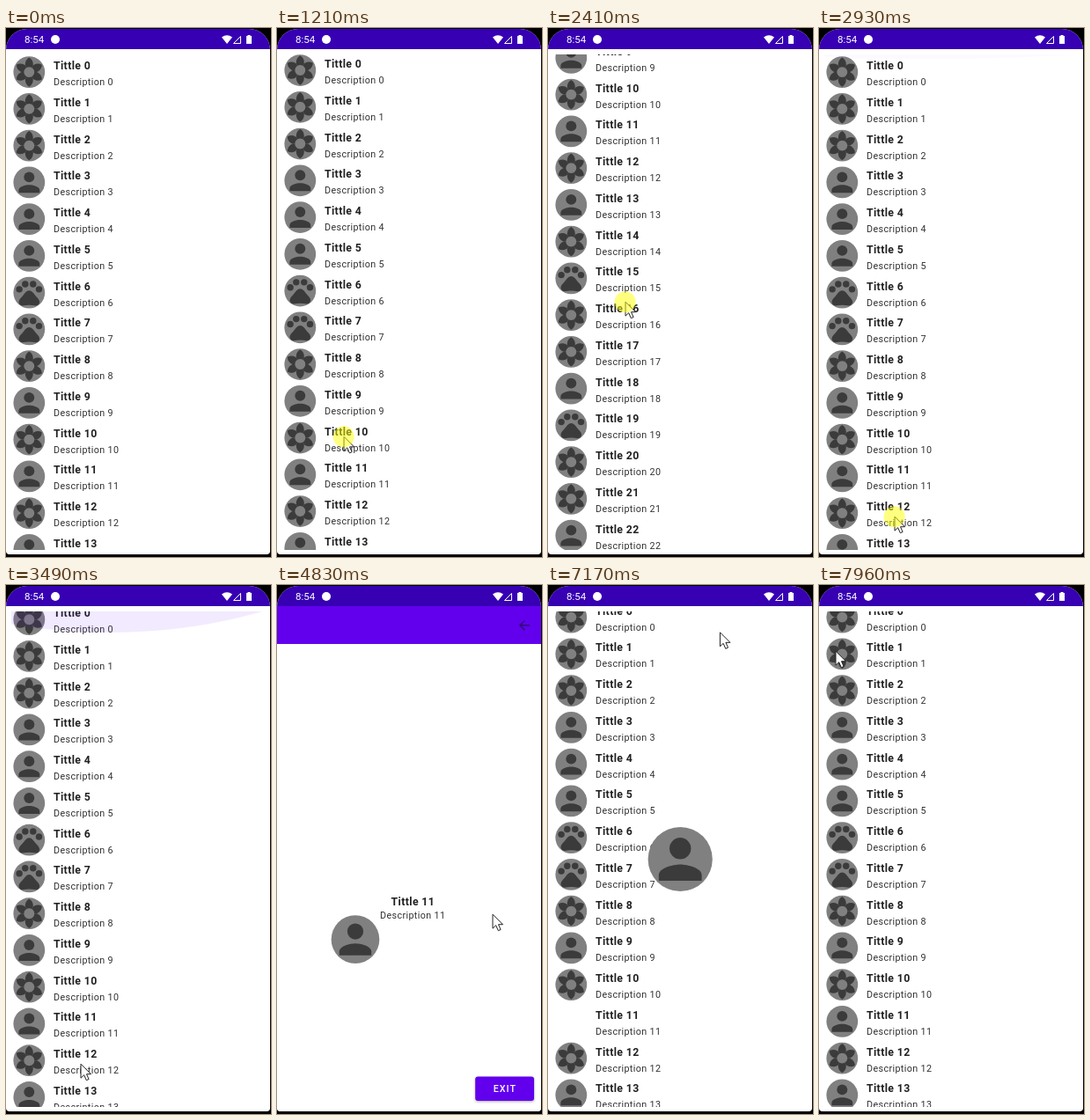
These frames come from a looping animation (301x601 px, 8000 ms). An HTML page with a canvas:

```html
<!DOCTYPE html>
<html lang="en">
<head>
<meta charset="utf-8">
<title>List and detail</title>
<style>
html, body { margin: 0; width: 100%; height: 100%; overflow: hidden; background: #000; }
canvas { display: block; width: 301px; height: 601px; }
</style>
</head>
<body>
<canvas id="stage"></canvas>
<script>
const W = 301, H = 601, LOOP = 8000;
const PITCH = 41.75, DP = 0.767;
const KINDS = 'FFFPPPAAFPFPFPFAFFPAFFPF';
const PICKED = 11;
const GREY = '#808080', DARK = '#3b3b3b', PURPLE = '#6200ee';
const canvas = document.getElementById('stage');
const ctx = canvas.getContext('2d');
const dpr = window.devicePixelRatio || 1;
canvas.width = W * dpr;
canvas.height = H * dpr;

function smooth(t, from, to) {
  const u = Math.min(1, Math.max(0, (t - from) / (to - from)));
  return u * u * (3 - 2 * u);
}

// Each pointer move eases to x, y between two times.
const MOVES = [
  [320, 820, 42, 547], [820, 1070, 76, 470], [1170, 1800, 79, 72],
  [2190, 2390, 88, 312], [2430, 2900, 86, 556], [3250, 3460, 85, 545],
  [3510, 4150, 26, 499], [4440, 4800, 245, 375], [5250, 5560, 172, 447],
  [5560, 6090, 254, 88], [6110, 6360, 275, 45], [6800, 7800, 19, 76]
];
const PRESSES = [[1120, 1870], [2350, 3440], [4150, 4290], [6550, 6760], [7810, 7955]];

function pointer(t) {
  let x = 179, y = 171;
  for (const [from, to, toX, toY] of MOVES) {
    const u = smooth(t, from, to);
    x += (toX - x) * u;
    y += (toY - y) * u;
  }
  return [x, y];
}

// Drag up, fling back to the top, then a short nudge.
const scrollAt = t =>
  392 * (smooth(t, 1185, 1800) - smooth(t, 2430, 2930)) + 13.5 * smooth(t, 3250, 3585);
const glowAt = t => smooth(t, 2900, 3050) * (1 - smooth(t, 3300, 3690));
const pageAt = t => smooth(t, 4560, 4760) - smooth(t, 6900, 7150);
const heroAt = t => smooth(t, 4700, 4960) - smooth(t, 7230, 7500);

function disc(x, y, r, color) {
  ctx.fillStyle = color;
  ctx.beginPath();
  ctx.arc(x, y, r, 0, Math.PI * 2);
  ctx.fill();
}

function box(x, y, w, h, color) {
  ctx.fillStyle = color;
  ctx.fillRect(x, y, w, h);
}

function text(str, x, y, font, color, spacing) {
  ctx.font = font + ' Roboto, sans-serif';
  ctx.letterSpacing = spacing * DP + 'px';
  ctx.fillStyle = color;
  ctx.fillText(str, x, y);
}

const title = (n, x, y) => text('Tittle ' + n, x, y, `bold ${16 * DP}px`, '#212121', 0.5);
const caption = (n, x, y) => text('Description ' + n, x, y, `${14 * DP}px`, '#303030', 0.5);

// Glyphs live in a 24 x 24 box centred on 12, 12.
const SHOULDERS = new Path2D('M12 14c-2.67 0-8 1.34-8 4v2h16v-2c0-2.66-5.33-4-8-4z');
const PETAL = new Path2D('M9 6Q9 2.6 12 .8Q15 2.6 15 6L14.92 6.95L12 12L9.08 6.95z');
const PAD = new Path2D('M17.3 14.9L14.9 12Q12 8.8 9.1 12L6.7 14.9Q3.4 18 4.2 20Q5 22 7 22Q12 21 17 22Q19 22 19.8 20Q20.6 18 17.3 14.9z');
const BACK = new Path2D('M20 11H7.8l5.6-5.6L12 4l-8 8 8 8 1.4-1.4L7.8 13H20z');
const ARROW = new Path2D('M.5 .5V16.5L4.2 13L6.8 19L9.6 17.8L7 12H12z');

const glyphs = {
  P() {
    disc(12, 8, 4, DARK);
    ctx.fill(SHOULDERS);
  },
  A() {
    for (const side of [-1, 1]) {
      disc(12 + side * 7.5, 9.5, 2.5, DARK);
      disc(12 + side * 3, 5.5, 2.5, DARK);
    }
    ctx.fill(PAD);
  },
  F() {
    ctx.fillStyle = DARK;
    for (let i = 0; i < 6; i++) {
      ctx.fill(PETAL);
      ctx.translate(12, 12);
      ctx.rotate(Math.PI / 3);
      ctx.translate(-12, -12);
    }
    disc(12, 12, 4, GREY);
  }
};

function inIconBox(x, y, scale, paint) {
  ctx.save();
  ctx.translate(x, y);
  ctx.scale(scale, scale);
  ctx.translate(-12, -12);
  paint();
  ctx.restore();
}

function avatar(kind, x, y, r) {
  disc(x, y, r, GREY);
  inIconBox(x, y, r / 12, glyphs[kind]);
}

function drawGlow(amount, touchX) {
  if (amount <= 0) return;
  const width = 289, r = width * 1.2;
  ctx.save();
  ctx.translate(6 + width / 4 + (touchX - 6) / 2, 30);
  ctx.scale(1, amount);
  disc(0, -r * Math.cos(Math.PI / 6), r, `rgba(98,0,238,${0.16 * amount})`);
  ctx.restore();
}

function drawList(t, touchX, heroAway) {
  const scroll = scrollAt(t);
  ctx.save();
  ctx.beginPath();
  ctx.rect(6, 30, 290, 563);
  ctx.clip();
  for (let i = 0; i < KINDS.length; i++) {
    const y = 50.1 + i * PITCH - scroll;
    if (y < 0 || y > 630) continue;
    if (!(heroAway && i === PICKED)) avatar(KINDS[i], 26.3, y, 17.9);
    title(i, 54, y - 3);
    caption(i, 54, y + 15);
  }
  drawGlow(glowAt(t), touchX);
  ctx.restore();
}

function drawButton() {
  ctx.save();
  ctx.shadowColor = 'rgba(0,0,0,.35)';
  ctx.shadowBlur = 3 * dpr;
  ctx.shadowOffsetY = dpr;
  ctx.fillStyle = PURPLE;
  ctx.beginPath();
  ctx.roundRect(225.2, 558.4, 66.8, 27.6, 3);
  ctx.fill();
  ctx.restore();
  text('EXIT', 245.8, 576.4, `500 ${14 * DP}px`, '#fff', 1.25);
}

function drawDetail(alpha) {
  if (alpha <= 0) return;
  ctx.save();
  ctx.globalAlpha = alpha;
  box(0, 24, 300, 575, '#fff');
  box(0, 24, 300, 43, PURPLE);
  inIconBox(281, 45.8, DP, () => {
    ctx.fillStyle = '#330a78';
    ctx.fill(BACK);
  });
  title(PICKED, 129.6, 363.5);
  caption(PICKED, 117, 379.4);
  drawButton();
  ctx.restore();
}

function drawStatus() {
  box(0, 0, 300, 24, '#3700b3');
  text('8:54', 21, 17.3, '11.5px', '#fff', 0);
  disc(56, 13, 5, '#fff');

  ctx.beginPath();
  ctx.moveTo(251, 18);
  ctx.lineTo(245, 10.5);
  ctx.quadraticCurveTo(251, 6, 257, 10.5);
  ctx.fill();

  ctx.strokeStyle = '#fff';
  ctx.lineWidth = 1;
  ctx.stroke(new Path2D('M258.5 17.5h8v-8z'));

  box(273, 9, 6, 9, '#fff');
  box(274.5, 8, 3, 1, '#fff');
}

function drawHero(p) {
  avatar(KINDS[PICKED], 26.3 + 123.9 * p, 495.9 - 184.4 * p, 17.9 + 18.7 * p);
}

function drawPointer(t, x, y) {
  if (t < 320) return;
  ctx.save();
  ctx.translate(x - 0.5, y - 1.3);
  ctx.fillStyle = '#fff';
  ctx.fill(ARROW);
  ctx.strokeStyle = '#222';
  ctx.lineWidth = 1;
  ctx.stroke(ARROW);
  ctx.restore();
  if (PRESSES.some(([from, to]) => t >= from && t < to)) {
    disc(x - 0.4, y - 0.8, 12, 'rgba(255,255,0,.5)');
  }
}

function draw(t) {
  const [x, y] = pointer(t);
  const page = pageAt(t), hero = heroAt(t);
  ctx.setTransform(dpr, 0, 0, dpr, 0, 0);
  box(0, 0, W, H, '#000');
  ctx.save();
  ctx.beginPath();
  ctx.roundRect(0, 1, 300, 597, [24, 24, 4, 4]);
  ctx.clip();
  box(0, 0, W, H, '#fff');
  drawList(t, x, hero > 0);
  drawDetail(page);
  if (page > 0 || hero > 0) drawHero(hero);
  drawStatus();
  drawPointer(t, x, y);
  ctx.restore();
}

const start = performance.now();
function tick() {
  draw((performance.now() - start) % LOOP);
  requestAnimationFrame(tick);
}
tick();
</script>
</body>
</html>
```
